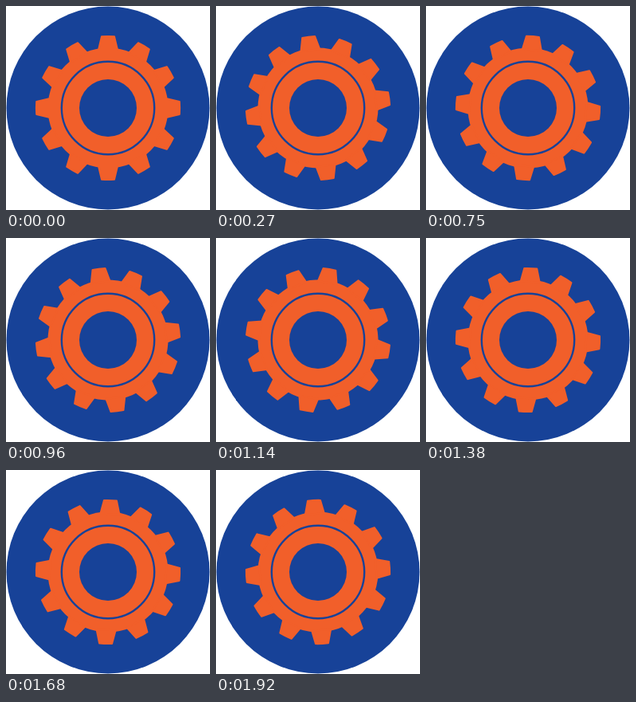
An HTML page that plays this animation: 256 by 256 pixels, repeating every 1.95 s.

```html
<!DOCTYPE html>
<html lang="en">
<head>
<meta charset="utf-8">
<title>Turning gear</title>
<style>
  html, body { margin: 0; width: 100%; height: 100%; overflow: hidden; background: #fff; }
  svg { display: block; width: 100vw; height: 100vh; }
  .blue { fill: #174298; }
  .orange { fill: #f15f2a; }
  .tooth { stroke: #f15f2a; stroke-width: 2; stroke-linejoin: round; }
  .groove { fill: none; stroke: #174298; stroke-width: 2.4; }
</style>
</head>
<body>
<svg viewBox="-128 -128 256 256">
  <circle class="blue" r="127.5"/>
  <g id="gear">
    <circle class="orange" r="75.5"/>
  </g>
  <circle class="groove" r="58.2"/>
  <circle class="blue" r="36"/>
</svg>
<script>
  const TEETH = 12, STEP = 30, STEPS = 65, TURN = 180;
  const gear = document.getElementById('gear');

  for (let i = 0; i < TEETH; i++) {
    const tooth = document.createElementNS('http://www.w3.org/2000/svg', 'path');
    tooth.setAttribute('class', 'orange tooth');
    tooth.setAttribute('d', 'M-12 -73 L-8 -89.8 Q0 -90.4 8 -89.8 L12 -73 Z');
    tooth.setAttribute('transform', `rotate(${i * 360 / TEETH})`);
    gear.append(tooth);
  }

  // The half turn starts a little slow and gathers speed.
  function angle(n) {
    const lag = (0.0047 + 0.00003 * n) * n * (STEPS - n);
    return TURN * n / STEPS - lag;
  }

  const start = performance.now();
  function draw() {
    const n = Math.floor((performance.now() - start) / STEP) % STEPS;
    gear.setAttribute('transform', `rotate(${angle(n).toFixed(3)})`);
    requestAnimationFrame(draw);
  }
  draw();
</script>
</body>
</html>
```
